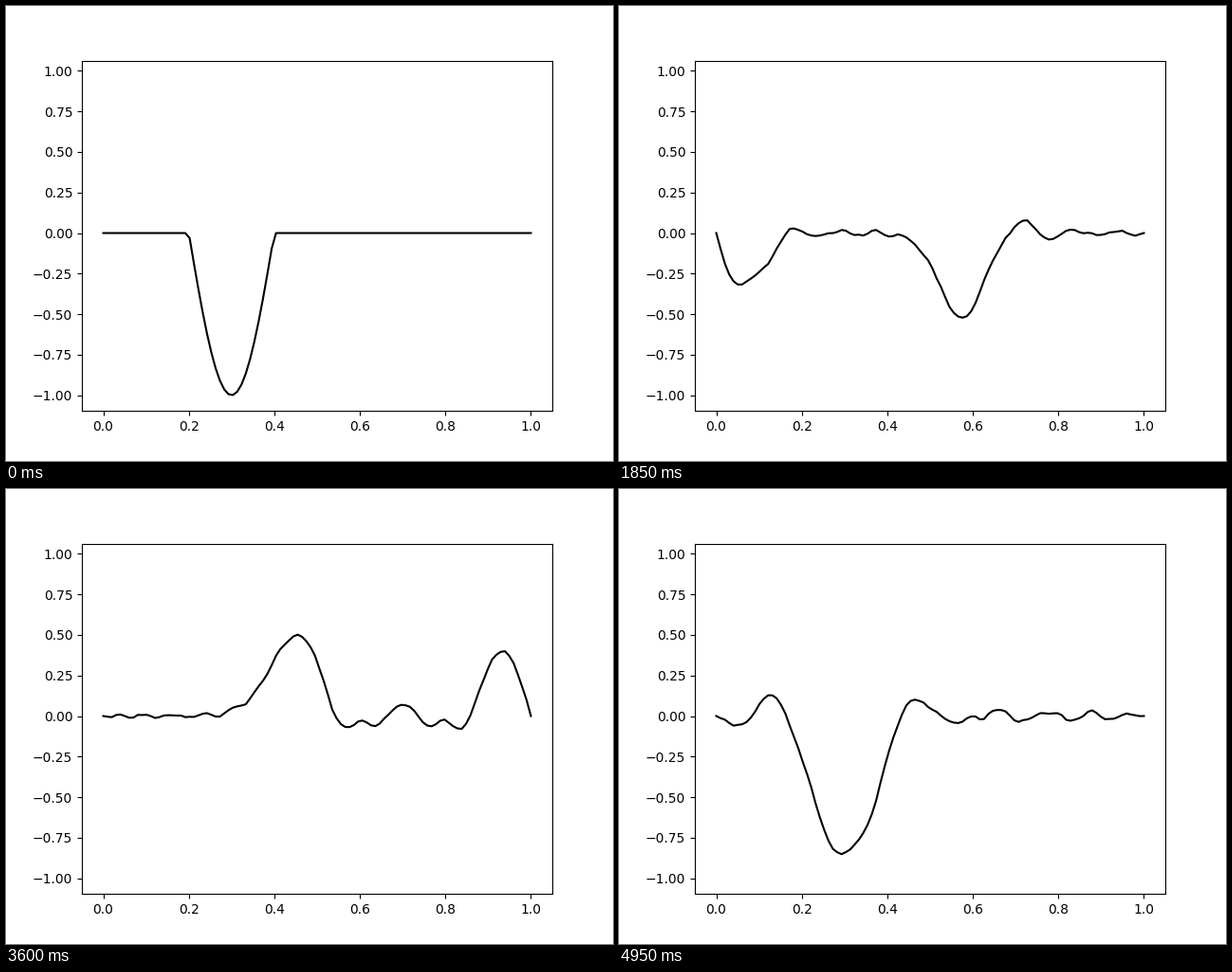
These frames come from a looping animation (640 by 480 pixels, 5 s). A matplotlib script:

```python
import numpy as np
import matplotlib.pyplot as plt
from matplotlib.animation import ArtistAnimation

N = 100          # grid points along the string
FRAMES = 100
T_END = 10.0     # simulated time covered by one loop

x = np.linspace(0, 1, N)
h = x[1] - x[0]
start = np.where((x > 0.2) & (x < 0.4), np.sin(5 * np.pi * x), 0.0)

# Sine modes of the finite-difference string with fixed ends
n = np.arange(1, N - 1)
modes = np.sin(np.pi * np.outer(x, n))
weights = 2 * h * modes.T @ start
omega = 2 / h * np.sin(n * np.pi * h / 2)


def string(t):
    return modes @ (weights * np.cos(omega * t))


fig, ax = plt.subplots(figsize=(6.4, 4.8), dpi=100)
# Axis limits come from the full range of the motion
artists = [ax.plot(x, string(t), color="black")
           for t in np.linspace(0, T_END, FRAMES)]

anim = ArtistAnimation(fig, artists, interval=50, repeat=True, repeat_delay=0)
plt.show()
```
